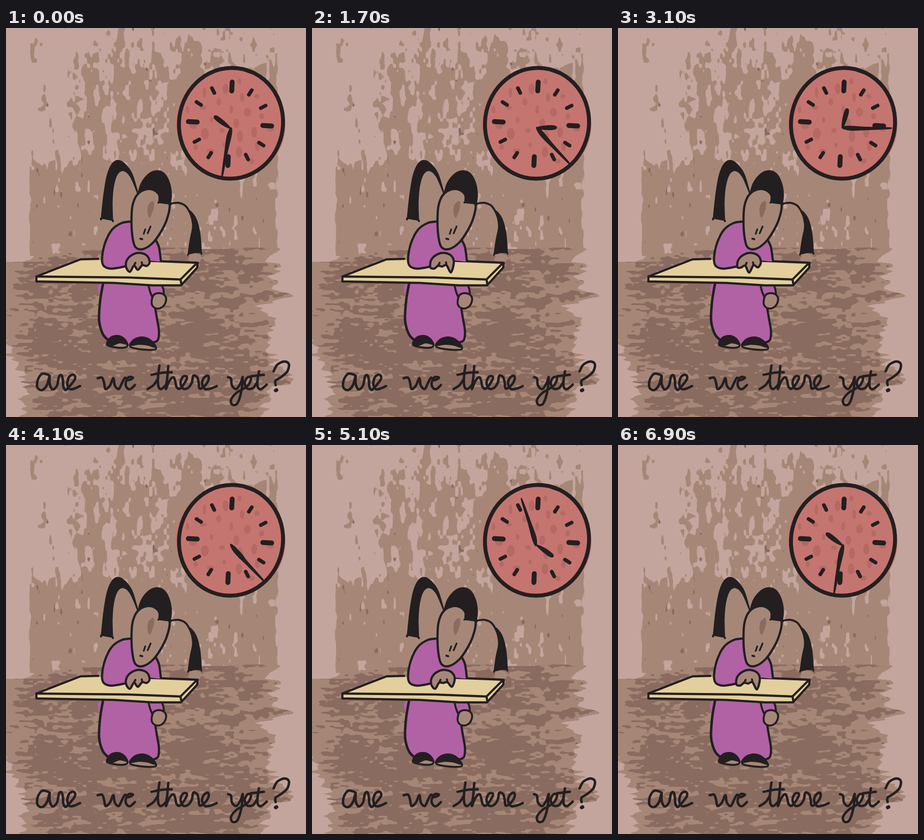
Write an HTML page with a canvas that moves like this. It is 612 px wide and 792 px high and loops after 7000 ms.

```html
<!DOCTYPE html>
<html lang="en">
<head>
<meta charset="utf-8">
<title>are we there yet?</title>
<style>
html, body { margin: 0; width: 100%; height: 100%; overflow: hidden; background: #c4a59d; }
canvas { display: block; width: 612px; height: 792px; }
</style>
</head>
<body>
<canvas id="stage" width="612" height="792" role="img" aria-label="are we there yet?"></canvas>
<script>
const W = 612, H = 792, DEG = Math.PI / 180;
const INK = '#231f20', TAN = '#a68777', DARK = '#8a6b5f', PLUM = '#b062a5',
      WOOD = '#e3cf9b', RED = '#c5756f', RED_DARK = '#b46963';
const PINK_RGB = [196, 165, 157], TAN_RGB = [166, 135, 119], DARK_RGB = [138, 107, 95];

const stage = document.getElementById('stage').getContext('2d');
const backdrop = document.createElement('canvas');
backdrop.width = W;
backdrop.height = H;
let ctx = backdrop.getContext('2d');

// ---- helpers ----
const clamp = v => Math.min(1, Math.max(0, v));
const lerp = (a, b, t) => a + (b - a) * t;
const ramp = (a, b, v) => clamp((v - a) / (b - a));
const bump = (mid, width, v) => Math.exp(-(((v - mid) / width) ** 2));

function hash(x, y, seed) {
  let h = Math.imul(x, 374761393) ^ Math.imul(y, 668265263) ^ Math.imul(seed + 7, 1442695041);
  h = Math.imul(h ^ (h >>> 13), 1274126177);
  h = Math.imul(h ^ (h >>> 15), 2246822519);
  return ((h ^ (h >>> 16)) >>> 0) / 4294967296;
}

function noise(x, y, seed) {
  const ix = Math.floor(x), iy = Math.floor(y);
  let u = x - ix, v = y - iy;
  u *= u * (3 - 2 * u);
  v *= v * (3 - 2 * v);
  return lerp(lerp(hash(ix, iy, seed), hash(ix + 1, iy, seed), u),
              lerp(hash(ix, iy + 1, seed), hash(ix + 1, iy + 1, seed), u), v);
}

// Smooth path through points; a repeated point makes a corner.
function curve(points, closed) {
  const p = typeof points === 'string' ? points.split(' ').map(s => s.split(',').map(Number)) : points;
  const n = p.length, path = new Path2D();
  const at = i => p[closed ? (i + n) % n : Math.min(n - 1, Math.max(0, i))];
  path.moveTo(...p[0]);
  for (let i = 0; i < (closed ? n : n - 1); i++) {
    const [a, b, c, d] = [at(i - 1), at(i), at(i + 1), at(i + 2)];
    path.bezierCurveTo(b[0] + (c[0] - a[0]) / 6, b[1] + (c[1] - a[1]) / 6,
                       c[0] - (d[0] - b[0]) / 6, c[1] - (d[1] - b[1]) / 6, c[0], c[1]);
  }
  if (closed) path.closePath();
  return path;
}

function paint(path, fill, width) {
  if (fill) { ctx.fillStyle = fill; ctx.fill(path); }
  if (width) {
    ctx.strokeStyle = INK;
    ctx.lineWidth = width;
    ctx.lineCap = ctx.lineJoin = 'round';
    ctx.stroke(path);
  }
}
const line = (points, width) => paint(curve(points), null, width);
const shape = (points, fill, width) => paint(curve(points, true), fill, width);
const straight = (d, fill, width) => paint(new Path2D(d), fill, width);

function oval(x, y, rx, ry, fill, turn = 0) {
  const path = new Path2D();
  path.ellipse(x, y, rx, ry, turn, 0, Math.PI * 2);
  paint(path, fill);
}

// ---- rough painted room: each part returns [amount of tan, amount of dark] ----
function wall(x, y) {
  const n = .55 * noise(x / 13, y / 32, 1) + .45 * noise(x / 6, y / 11, 2);
  const d = .6 * noise(x / 13, y / 26, 3) + .4 * noise(x / 7, y / 12, 4);
  const fray = noise(x / 9, y / 14, 5) * 8;
  const inside = clamp(Math.min(x - 44 - fray, 557 - fray - x));
  const upper = (.12 + .5 * ramp(120, 170, x) + .24 * ramp(280, 370, x)) * ramp(-20, 110, y)
    + .3 * bump(228, 16, x) * ramp(110, 40, y);
  const cover = lerp(upper, .88, ramp(255, 300, y));
  return [clamp((.5 + (cover - .5) * .62 - n) * 26 + .5) * inside,
          clamp((d - lerp(.89, .84, ramp(180, 320, y))) * 30 + .5) * inside];
}

function floor(x, y) {
  const n = .52 * noise(x / 38, y / 7, 11) + .48 * noise(x / 10, y / 4.5, 12);
  const fray = (noise(x / 70, y / 5, 13) - .5) * 34;
  const left = y < 476 ? 46 : lerp(-25, 36, ramp(600, 720, y));
  const right = 545 + 42 * bump(546, 8, y) - 36 * bump(570, 9, y) + 42 * bump(712, 14, y) - 20 * ramp(730, 792, y);
  const edge = Math.min(x - left, right - x) + fray;
  let limit = lerp(.55, .62, ramp(590, 620, y)) - .34 * (1 - ramp(5, 50, edge));
  if (y > 476 && y < 605) limit -= .25 * (1 - ramp(0, 70, x));
  return [clamp(edge / 2), clamp((limit - n) * 22 + .5) * clamp(edge / 2)];
}

function paintRoom() {
  const img = ctx.createImageData(W, H);
  for (let y = 0, k = 0; y < H; y++) {
    for (let x = 0; x < W; x++, k += 4) {
      const top = 448 + 14 * ramp(230, 70, x) + 2 * Math.sin(x / 30);
      const [tan, dark] = y < top ? wall(x, y) : floor(x, y);
      for (let c = 0; c < 3; c++)
        img.data[k + c] = lerp(lerp(PINK_RGB[c], TAN_RGB[c], tan), DARK_RGB[c], dark);
      img.data[k + 3] = 255;
    }
  }
  ctx.putImageData(img, 0, 0);
}

// ---- clock face ----
function paintClock() {
  oval(458, 195, 113, 109.5, RED, 35 * DEG);
  for (let i = 0; i < 26; i++) {
    const a = i * 2.4, r = 18 * Math.sqrt(i + .5);
    oval(457 + r * Math.cos(a), 194 + r * Math.sin(a), 3 + 5 * hash(i, 1, 9), 4 + 8 * hash(i, 2, 9), RED_DARK);
  }

  // wobbly rim whose ends overlap
  const rim = [];
  for (let deg = -77; deg <= 295; deg += 12) {
    const r = 109.5 + 3.5 * Math.cos(2 * (deg - 100) * DEG);
    rim.push([459 + r * Math.cos(deg * DEG), 194 + r * Math.sin(deg * DEG)]);
  }
  line(rim, 8);

  for (let hour = 0; hour < 12; hour++) {
    const quarter = hour % 3 === 0, half = quarter ? 9 : 5.5;
    const a = (hour * 30 + 3) * DEG, dx = Math.sin(a), dy = -Math.cos(a);
    line([76 - half, 76 + half].map(r => [457 + r * dx, 195 + r * dy]), quarter ? 10 : 7.5);
  }
}

// ---- figure and table ----
function paintFigure() {
  // ears
  shape('217,391 217,350 222,305 240,290 254,300 268,334 259,358 256,394', TAN);
  shape('195,387 195,387 200,340 207,300 217,277 229,270 244,279 257,298 268,334 268,334 254,302 '
      + '240,290 227,297 219,321 216,355 217,391 217,391', INK, 3);
  line('334,358 352,356 367,363 378,382 384,402', 4);
  shape('375,373 387,388 395,418 398,457 398,457 385,457 372,460 372,460 376,432 381,406 379,388', INK, 3);

  // skirt and shoes
  shape('197,518 192,556 190,596 198,626 214,639 250,643 292,642 310,634 311,608 306,572 304,518', PLUM);
  line('198,520 192,556 190,596 198,624 212,638', 5);
  line('304,568 308,592 312,616 310,635 301,640', 4.5);
  shape('206,645 213,631 228,627 241,633 248,646 240,651 222,650', TAN, 4);
  shape('206,645 213,631 228,627 241,633 247,644 232,641 218,646', INK, 2);
  shape('254,649 261,635 279,630 296,637 306,653 284,655', TAN, 4);
  shape('255,646 261,635 279,630 296,637 304,650 290,646 272,644', INK, 2);

  // hanging arm
  straight('M291,524L319,524L323,541L306,544L297,546', PLUM);
  line('291,525 294,537 299,549', 4);
  line('318,524 321,532 322,541', 4);
  shape('298,551 303,542 315,540 325,546 326,557 319,568 307,571 298,564', TAN, 4);

  // table
  straight('M62,506L152,471L391,479L390,488L357,524L62,516Z', WOOD);
  straight('M188,470L152,471L108,488L62,506L62,516L220,519L300,524L357,524L390,488L391,478L292,474', null, 4.5);
  straight('M62,506L250,508L356,512L388,480M356,512L358,523', null, 4.5);

  // top
  shape('257,394 235,398 215,412 202,438 196,470 201,485 216,489 245,484 290,474 316,474 '
      + '313,450 306,432 285,430', PLUM);
  line('256,394 236,397 216,411 202,438 196,468 199,484 215,490 245,485', 4.5);
  line('305,431 312,446 316,474', 4.5);

  // head and hair
  shape('256,394 258,362 268,339 288,328 312,333 327,345 334,362 328,390 316,415 300,437 '
      + '280,450 264,446 258,425', TAN, 4.5);
  shape('290,361 300,352 302,364 294,386 289,378', DARK);
  shape('270,336 270,336 277,315 292,297 308,291 323,297 333,315 337,338 335,358 335,358 312,355 312,355 '
      + '312,341 302,331 287,328', INK, 3);
  line('295,404 289,418', 3.5);
  line('284,410 281,419', 3.5);
  line('274,429 278,430', 4);
}

function paintLettering() {
  const are = '86,706 74,704 65,716 64,732 74,737 84,726 89,708 89,724 95,736 104,728 108,710 113,707 116,716 '
    + '117,730 122,737 131,728 141,714 138,706 129,710 125,724 130,735 140,734 151,729';
  const we = '187,713 196,712 200,722 203,735 212,728 219,713 222,728 230,735 237,722 243,712 250,717 '
    + '259,712 250,711 244,723 247,733 254,735 263,727';
  const there = '331,688 329,712 326,735 333,719 341,711 345,718 348,731 355,734 366,720 369,710 361,710 '
    + '356,722 361,734 371,733 379,722 382,708 390,711 393,722 395,734 404,730 413,717 412,708 404,712 '
    + '400,724 406,735 418,734 430,729';
  const yet = '453,711 459,714 461,728 470,735 479,722 483,711 480,740 472,764 462,767 459,757 470,743 485,734 '
    + '495,726 500,713 493,711 487,722 492,734 504,733 513,720';
  const ask = '546,699 553,686 567,679 577,684 574,699 562,710 550,718 550,727';
  [are, we, there, yet, ask,
   '289,735 301,727 310,714', '313,687 310,712 311,730 317,735 326,727', '297,706 318,702 338,701',
   '516,699 513,718 514,732 521,735 532,726', '500,709 526,706'].forEach(s => line(s, 5));
  line('550,738 552,737', 7);
}

// ---- moving parts ----
const PERIOD = 7000, STEP = 100;
// Key poses of the clock: tick, minute angle, hour angle.
const POSES = [[0, 190, 306], [17, 857, 808], [31, 1170, 1094], [41, 1577, 1217],
               [51, 1782, 1564], [60, 1952, 1834], [69, 2350, 2106]];
// Phase of the finger roll, in degrees, for each beat.
const DRUM = [40, 50, 320, 260, 120, 50, 260, 320, 40, 120, 50];

function clockAngles(tick) {
  const i = Math.max(1, POSES.findIndex(p => p[0] >= tick));
  const [a, b] = [POSES[i - 1], POSES[i]], t = ramp(a[0], b[0], tick);
  return [lerp(a[1], b[1], t), lerp(a[2], b[2], t)];
}

function clockHand(angle, outline) {
  ctx.save();
  ctx.translate(458, 204);
  ctx.rotate(angle * DEG);
  shape(outline, INK, 2);
  ctx.restore();
}

function fist(phase) {
  const sway = 1 + 2 * Math.cos((phase - 45) * DEG);
  const tip = k => 491 + 7 * Math.cos((phase - 120 * k) * DEG);
  ctx.save();
  ctx.translate(sway, 0);
  shape([[242, 487], [244, 472], [256, 461], [271, 458], [285, 464], [290, 477],
         [284, tip(2)], [275, 483], [266, tip(1)], [258, 484], [250, tip(0)]], TAN, 4.5);
  line('258,484 261,478', 4);
  line('275,483 274,477', 4);
  ctx.restore();
}

function draw(tick) {
  const [minute, hour] = clockAngles(tick);
  ctx.drawImage(backdrop, 0, 0);
  clockHand(hour, '-1,-1 -4,-18 -3,-38 2,-40 4,-30 2,-8');
  clockHand(minute, '-1,1 -4,-12 -2,-50 -1,-95 1,-95 3,-50 4,-16');
  fist(DRUM[tick % DRUM.length]);
}

paintRoom();
paintClock();
paintFigure();
paintLettering();
ctx = stage;

const start = performance.now();
let shown = -1;
function loop() {
  const tick = Math.floor((performance.now() - start) % PERIOD / STEP);
  if (tick !== shown) draw(shown = tick);
  requestAnimationFrame(loop);
}
loop();
</script>
</body>
</html>
```
